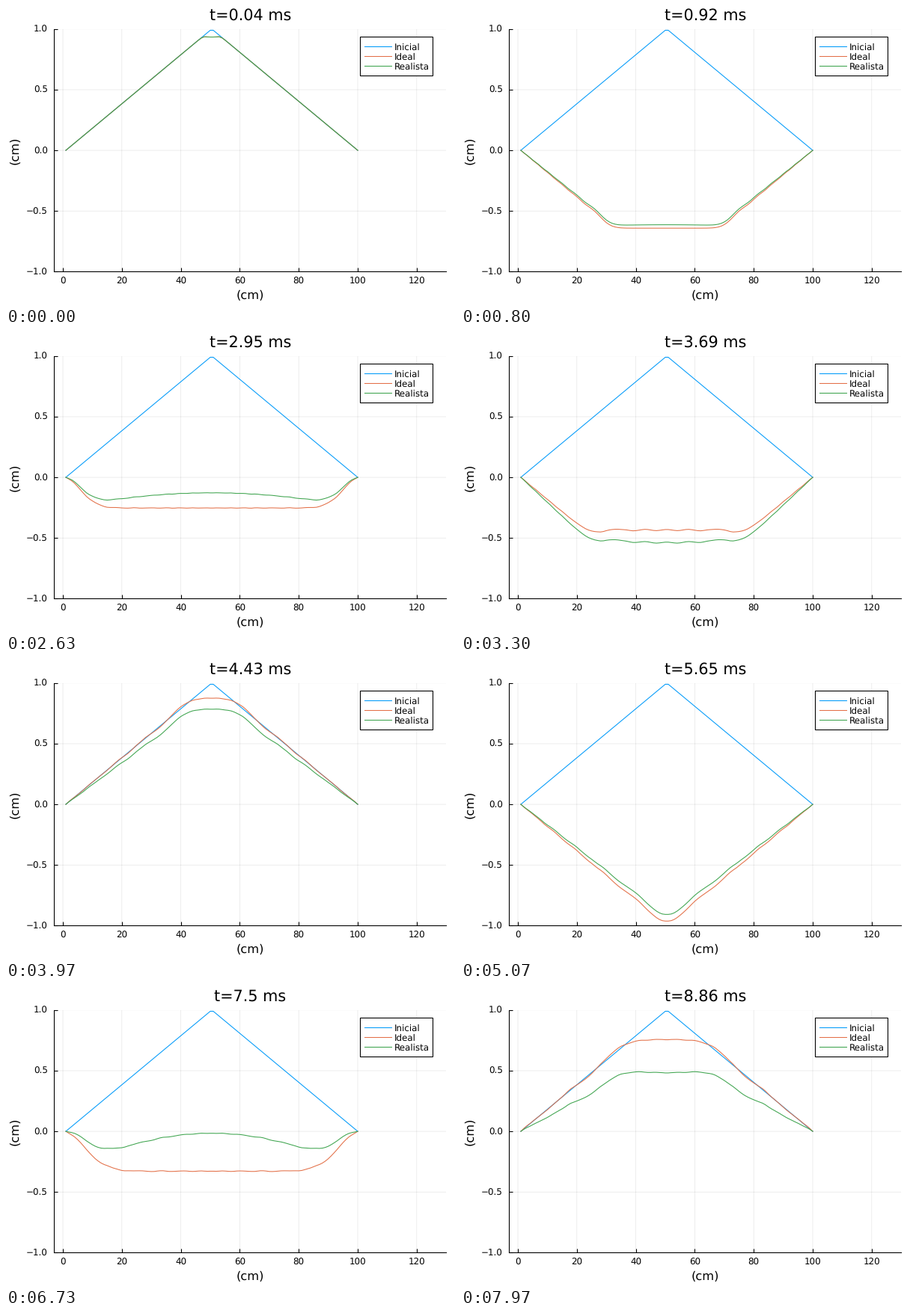
A matplotlib script that plays this animation: 600x400 px, repeating every 8000 ms.

```python
import numpy as np
import matplotlib.pyplot as plt
from matplotlib.animation import FuncAnimation
from matplotlib.lines import Line2D
from matplotlib.patches import Rectangle

W, H, DPI = 600, 400, 100
PX = 72 / DPI                       # points per pixel
LEFT, RIGHT, TOP, BOTTOM = 64.2, 588.2, 30.8, 355.4
BLUE, ORANGE, GREEN = "#009afa", "#e36f47", "#3ea44e"
CURVE, RULE = 1.05 * PX, 1.1 * PX

STEPS, LOOP_MS, TICK_MS = 240, 8000, 20
CELLS = 99                          # string divided into 99 cells of 1 cm
SPEED, DX = 880.0, 0.01             # m/s, m
COURANT, SUBSTEPS = 0.25, 13
STEP_MS = 1000 * SUBSTEPS * COURANT * DX / SPEED
SOFTENING = 0.0388                  # lowers the slow modes of the real string
DECAY = 0.0155 * SUBSTEPS * COURANT / (2 * CELLS)

plt.rcParams["font.family"] = "DejaVu Sans"
plt.rcParams["text.hinting"] = "none"

# Plucked string, split into the modes of the discrete wave equation
cell = np.arange(CELLS + 1)
x = cell + 1
pluck = 2 * np.minimum(cell, CELLS - cell) / CELLS
mode = np.arange(1, CELLS)
shapes = np.sin(np.pi * np.outer(cell, mode) / CELLS)
weights = 2 / CELLS * pluck @ shapes
omega = 2 * SUBSTEPS * np.arcsin(COURANT * np.sin(np.pi * mode / (2 * CELLS)))
omega_real = np.sqrt(omega**2 - SOFTENING * omega[0] ** 2)


def ideal(n):
    return shapes @ (weights * np.cos(omega * n))


def realistic(n):
    return np.exp(-DECAY * n) * (shapes @ (weights * np.cos(omega_real * n)))


fig = plt.figure(figsize=(W / DPI, H / DPI), dpi=DPI, facecolor="white")


def label(px, py, text, size, ha="center", **kw):
    return fig.text(px / W, 1 - py / H, text, fontsize=size * PX, ha=ha,
                    va="baseline", color="black", **kw)


ax = fig.add_axes([LEFT / W, 1 - BOTTOM / H,
                   (RIGHT - LEFT) / W, (BOTTOM - TOP) / H])
ax.set_xlim(-3, 130)
ax.set_ylim(-1, 1)
xticks = np.arange(0, 121, 20)
yticks = np.linspace(-1, 1, 5)
ax.set_xticks(xticks)
ax.set_yticks(yticks)
ax.tick_params(direction="in", length=5 * PX, width=RULE,
               labelbottom=False, labelleft=False)
ax.grid(color="black", alpha=0.1, linewidth=0.7 * PX)
plt.setp(ax.get_xgridlines() + ax.get_ygridlines(), snap=False)
ax.set_axisbelow(True)
for side in ("top", "right"):
    ax.spines[side].set_visible(False)
for side in ("left", "bottom"):
    ax.spines[side].set_linewidth(RULE)

for v in xticks:
    label(LEFT + (v + 3) / 133 * (RIGHT - LEFT), 371.8, str(v), 11.85)
for v in yticks:
    py = BOTTOM - (v + 1) / 2 * (BOTTOM - TOP)
    label(56, py + 4.3, f"{v:.1f}".replace("-", "\u2212"), 11.85, ha="right")
label(326.3, 391.7, "(cm)", 16.3)
label(16, 193.2, "(cm)", 16.3, rotation=90, rotation_mode="anchor")
title = label(326.4, 18.3, "", 20.75)

ax.plot(x, pluck, color=BLUE, lw=CURVE)
ideal_line, = ax.plot(x, pluck, color=ORANGE, lw=CURVE)
real_line, = ax.plot(x, pluck, color=GREEN, lw=CURVE)

# Legend
fig.add_artist(Rectangle((473.2 / W, 1 - 93.2 / H), 97.2 / W, 52 / H,
                         transform=fig.transFigure, facecolor="white",
                         edgecolor="black", lw=RULE))
entries = [("Inicial", BLUE), ("Ideal", ORANGE), ("Realista", GREEN)]
for row, (name, color) in enumerate(entries):
    py = 54.2 + 13 * row
    fig.add_artist(Line2D([479 / W, 515 / W], [1 - py / H] * 2, color=color,
                          lw=CURVE, transform=fig.transFigure))
    label(518.5, py + 4.6, name, 11.85, ha="left")


def update(i):
    # steps change on a 10 ms clock, read in the middle of each tick
    t = (i + 0.5) * TICK_MS
    n = int((t + 5) * STEPS / LOOP_MS) + 1
    ideal_line.set_ydata(ideal(n))
    real_line.set_ydata(realistic(n))
    title.set_text(f"t={round(n * STEP_MS, 2)} ms")
    return ideal_line, real_line, title


anim = FuncAnimation(fig, update, frames=LOOP_MS // TICK_MS, interval=TICK_MS,
                     init_func=lambda: update(0), repeat=True, repeat_delay=0)
plt.show()
```
